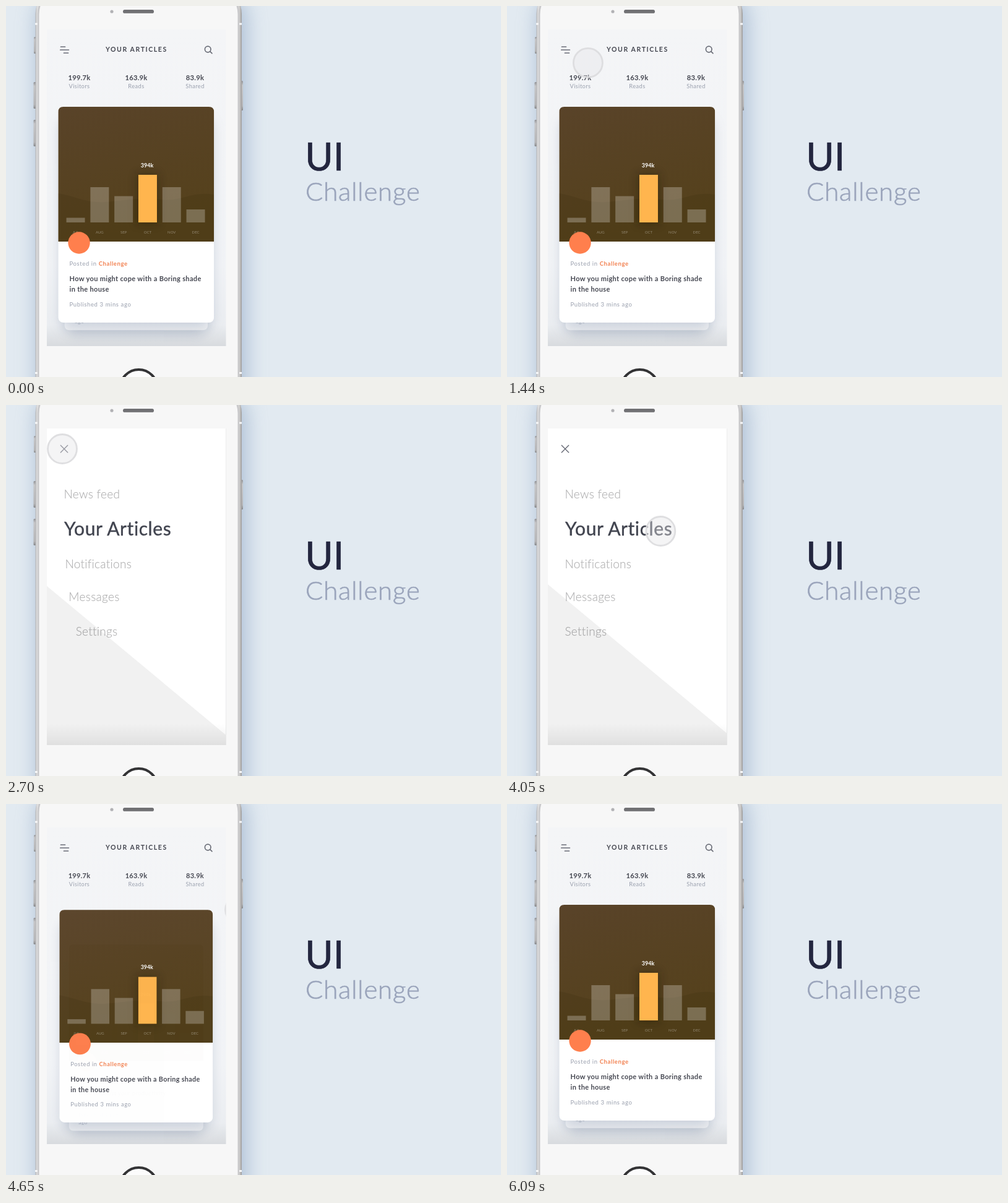
Write an HTML page that moves like this. It is 800 px wide and 600 px high and loops after 6120 ms.

```html
<!DOCTYPE html>
<html lang="en">
<head>
<meta charset="utf-8">
<title>UI Challenge</title>
<style>
html, body { margin: 0; width: 100%; height: 100%; overflow: hidden; background: #e2eaf1; }
svg { display: block; width: 800px; height: 600px; font-family: Lato, "Open Sans", sans-serif; }
.b { font-weight: 700; }
.mid { text-anchor: middle; }
.ink { fill: #454751; }
.soft { fill: #999fad; font-size: 9.5px; letter-spacing: .6px; }
.title { font-size: 11px; letter-spacing: .35px; }
.month { fill: #fff; fill-opacity: .38; font-size: 6px; }
.item { fill: #202024; fill-opacity: .33; stroke: #202024; stroke-opacity: .12; stroke-width: .4px; font-size: 19px; font-weight: 300; letter-spacing: .3px; }
.item.on { fill: #41444f; fill-opacity: 1; stroke: #41444f; stroke-opacity: 1; font-size: 30px; font-weight: 400; letter-spacing: .6px; }
.line { fill: none; stroke: #6b6e78; stroke-width: 1.7; stroke-linecap: round; }
</style>
</head>
<body>
<svg viewBox="0 0 800 600">
  <defs>
    <linearGradient id="page" x2="0" y2="1">
      <stop offset="0" stop-color="#f4f5f7"/><stop offset=".75" stop-color="#f1f3f6"/><stop offset="1" stop-color="#e8ebef"/>
    </linearGradient>
    <linearGradient id="brown" x2=".3" y2="1">
      <stop offset="0" stop-color="#594329"/><stop offset="1" stop-color="#55411b"/>
    </linearGradient>
    <linearGradient id="foot" x2="0" y2="1">
      <stop offset="0" stop-opacity="0"/><stop offset="1" stop-opacity=".07"/>
    </linearGradient>
    <linearGradient id="metal">
      <stop offset="0" stop-color="#b4b4b6"/><stop offset=".008" stop-color="#dededf"/>
      <stop offset=".5" stop-color="#e6e6e7"/><stop offset=".988" stop-color="#d2d1d0"/><stop offset="1" stop-color="#9d9b9b"/>
    </linearGradient>
    <linearGradient id="key" x2="0" y2="1">
      <stop offset="0" stop-color="#8f9094"/><stop offset=".15" stop-color="#c6c6c8"/>
      <stop offset=".85" stop-color="#b5b5b7"/><stop offset="1" stop-color="#858689"/>
    </linearGradient>
    <filter id="wide" x="-30%" y="-10%" width="160%" height="120%"><feGaussianBlur stdDeviation="16"/></filter>
    <filter id="blur" x="-40%" y="-40%" width="180%" height="180%"><feGaussianBlur stdDeviation="11"/></filter>
    <filter id="glow" x="-80%" y="-50%" width="260%" height="200%"><feGaussianBlur stdDeviation="7"/></filter>
    <clipPath id="screen"><rect x="66" y="38" width="289.5" height="512"/></clipPath>
    <clipPath id="wipe"><path id="bands"/></clipPath>
  </defs>

  <rect width="800" height="600" fill="#e2eaf1"/>
  <rect x="48" y="-20" width="342" height="700" rx="40" fill="#829dc0" opacity=".52" filter="url(#wide)"/>

  <g id="phone">
    <g fill="url(#key)">
      <rect x="45" y="50" width="5" height="27" rx="1.5"/>
      <rect x="44.5" y="123" width="5" height="43" rx="1.5"/>
      <rect x="44.5" y="184" width="5" height="43" rx="1.5"/>
      <rect x="378" y="121" width="5" height="48" rx="1.5"/>
    </g>
    <rect x="47.5" y="-35" width="333.5" height="720" rx="48" fill="url(#metal)"/>
    <path d="M47 29h5M376 29h5M47 593.5h5M376 593.5h5" stroke="#f7f7f8" stroke-width="3"/>
    <rect x="51" y="-32" width="326" height="714" rx="45" fill="#c9c9cb"/>
    <rect x="53.5" y="-30" width="321" height="710" rx="43" fill="#f7f7f7"/>
    <circle cx="171" cy="9" r="2.6" fill="#b2b2b5"/>
    <rect x="189" y="6" width="50" height="5.8" rx="2.9" fill="#707073"/>
    <circle cx="214.5" cy="618" r="30" fill="#fcfcfc" stroke="#333335" stroke-width="4"/>
  </g>

  <g clip-path="url(#screen)">
    <rect x="66" y="38" width="290" height="512" fill="url(#page)"/>
    <path class="line" d="M88.5 66h7M87.8 71h13.6M93.5 76h7"/>
    <text class="b ink" x="161" y="74" font-size="10.5" letter-spacing="1.6">YOUR ARTICLES</text>
    <g class="line"><circle cx="326.2" cy="70" r="4.8"/><path d="M329.9 73.7l3 3"/></g>
    <g id="stats"></g>
    <g id="back"></g>
    <g id="front"></g>
    <rect id="shade" x="66" y="38" width="290" height="512"/>
    <g clip-path="url(#wipe)">
      <rect x="66" y="38" width="290" height="512" fill="#fff"/>
      <path id="slope" d="M66 290L356 531.5V820H66Z" fill="#f1f1f1"/>
    </g>
    <g id="items"></g>
    <path id="cross" d="M88.3 65.3l11.4 11.4M99.7 65.3L88.3 76.7" stroke="#636672" stroke-width="1.35" stroke-linecap="round"/>
    <rect x="66" y="515" width="290" height="35" fill="url(#foot)"/>
    <circle id="touch" r="23.5" fill="#e4e4e6" fill-opacity=".4" stroke="#dcdcde" stroke-opacity=".9" stroke-width="2.8"/>
  </g>

  <text x="483.3" y="266" font-size="62" letter-spacing="0" fill="#23263f" stroke="#23263f" stroke-width=".7">UI</text>
  <text x="484" y="315" font-size="42" font-weight="300" letter-spacing=".8" fill="#9aa4bb" stroke="#9aa4bb" stroke-width=".7">Challenge</text>
</svg>

<script>
const LOOP = 6120;
const $ = id => document.getElementById(id);
const clamp = v => Math.max(0, Math.min(1, v));
const prog = (t, start, length) => clamp((t - start) / length);
const inOut = u => u < .5 ? 4 * u ** 3 : 1 - 4 * (1 - u) ** 3;
const mix = (a, b, u) => a + (b - a) * u;

const months = ['JUL', 'AUG', 'SEP', 'OCT', 'NOV', 'DEC'];
const heights = [7.5, 57, 42.5, 77, 57, 21];

function card(title, published) {
  const bars = heights.map((h, i) => {
    const x = 13 + 38.8 * i;
    const fill = i === 3 ? 'fill="#ffb54e"' : 'fill="#fff" fill-opacity=".25"';
    return `<rect x="${x}" y="${187 - h}" width="30" height="${h}" ${fill}/>
      <text class="month mid" x="${x + 15}" y="204.5">${months[i]}</text>`;
  }).join('');
  const rows = (list, y, step, cls) => list.map((s, i) =>
    `<text class="${cls}" x="18" y="${y + i * step}">${s}</text>`).join('');
  return `<rect x="6" y="22" width="239.5" height="335" rx="10" fill="#5d6f90" opacity=".34" filter="url(#blur)"/>
    <rect width="251.5" height="349" rx="8" fill="#fff"/>
    <path d="M0 218V8Q0 0 8 0H243.5Q251.5 0 251.5 8V218Z" fill="url(#brown)"/>
    <path d="M0 140C25 144 45 156 75 154S130 146 165 150S215 136 251.5 142V218H0Z" fill="#2c2000" opacity=".13"/>
    <rect x="126" y="108" width="36" height="82" fill="#1d1400" opacity=".35" filter="url(#glow)"/>
    ${bars}
    <text class="b mid" x="143.5" y="97.5" font-size="9" fill="#fff">394k</text>
    <circle cx="33.5" cy="220" r="17.7" fill="#ff7f4d"/>
    <text class="soft" x="18" y="257">Posted in <tspan class="b" fill="#f28150">Challenge</tspan></text>
    ${rows(title, 282, 17.3, 'b ink title')}
    ${rows(published, 322.5, 14, 'soft')}`;
}

$('front').innerHTML = card(['How you might cope with a Boring shade', 'in the house'], ['Published 3 mins ago']);
$('back').innerHTML = card(['How to boost your productivity', '230% daily'], ['Published 3 mins', 'ago']);

const statX = [118.5, 210.5, 305.5];
$('stats').innerHTML = [['199.7k', 'Visitors'], ['163.9k', 'Reads'], ['83.9k', 'Shared']].map(([n, name]) =>
  `<g><text class="b ink mid" y="-2.5" font-size="11.2" letter-spacing=".25">${n}</text>
   <text class="soft mid" y="10.7" style="font-size:9.3px;letter-spacing:.4px">${name}</text></g>`).join('');
const stats = [...$('stats').children];

const labels = [['News feed', 151], ['Your Articles', 211], ['Notifications', 264], ['Messages', 316.5], ['Settings', 373]];
$('items').innerHTML = labels.map(([s, y], i) =>
  `<text class="item${i === 1 ? ' on' : ''}" x="${i === 1 ? 94 : 93.5}" y="${y}">${s}</text>`).join('');
const items = [...$('items').children];

// Home content shrinks away when the menu opens and springs back when it closes.
function pose(t, lag) {
  if (t < 4200) {
    const e = inOut(prog(t, 1998, 510));
    return { k: 1 - .5 * e, dy: 57 * e, alpha: 1 - .43 * e };
  }
  const u = prog(t, 4260 + lag, 570);
  return { k: 1 - .5 * (1 - u) ** 3, dy: 57 * (1 - u) ** 2, alpha: Math.min(1, .57 + .6 * u) };
}

function placeCard(el, y, size, { k, dy }, alpha) {
  el.setAttribute('transform', `translate(210.3 ${y + dy}) scale(${k * size}) translate(-125.75 -174.5)`);
  el.setAttribute('opacity', alpha);
}

// time, x, y, easing into this point
const path = [
  [700, 382, 224],
  [1260, 153, 104, u => 1 - (1 - u) ** 1.7],
  [1440, 131, 92, u => u],
  [1980, 91, 71, u => u],
  [3030, 91, 71, u => u],
  [3690, 248.3, 204, inOut],
  [4300, 248.3, 204, u => u],
  [4785, 390, 168, inOut]
];

function touchAt(t) {
  const i = path.findIndex(p => p[0] > t);
  if (i < 1) return path[i ? path.length - 1 : 0].slice(1, 3);
  const [t0, x0, y0] = path[i - 1], [t1, x1, y1, ease] = path[i];
  const u = ease((t - t0) / (t1 - t0));
  return [mix(x0, x1, u), mix(y0, y1, u)];
}

const press = (t, start, length) => Math.sin(Math.PI * prog(t, start, length));

// Diagonal band between two heights measured on the left edge of the screen.
const band = (a, b) => `M66 ${a}L356 ${a - 167}V${b - 167}L66 ${b}Z`;

function draw(t) {
  const front = pose(t, 0), back = pose(t, 105);
  placeCard($('front'), 337.5, 1, front, front.alpha);
  placeCard($('back'), 363.8, .92, back, .65);
  stats.forEach((g, i) => {
    g.setAttribute('transform', `translate(${statX[i]} 122.5) scale(${front.k})`);
    g.setAttribute('opacity', front.alpha);
  });

  const shade = inOut(prog(t, 1980, 400)) * (1 - prog(t, 4200, 260));
  $('shade').setAttribute('opacity', .23 * shade);

  const open = (t < 4000 ? prog(t, 2140, 460) : 1 - prog(t, 4110, 340)) ** 1.69;
  $('bands').setAttribute('d', open
    ? band(-150, 38 + 151 * open) + band(326.5 - 140 * open, 326.5 + 140 * open) + band(717 - 290 * open, 900)
    : '');
  $('slope').setAttribute('transform', `translate(0 ${260 * (1 - prog(t, 2360, 400)) ** 2.4})`);

  items.forEach((el, i) => {
    const came = prog(t, 2270 + 40 * i, 400), left = prog(t, 4080 + 25 * i, 250);
    el.setAttribute('transform', `translate(${290 * ((1 - came) ** 2.4 + left ** 2.4)} 0)`);
    el.setAttribute('opacity', Math.min(1, (1.5 * came) ** 1.5) * (1 - left));
  });
  $('cross').setAttribute('opacity', prog(t, 2470, 160) * (1 - prog(t, 4110, 140)));

  const [x, y] = touchAt(t);
  const k = 1 - .18 * (press(t, 1830, 330) + press(t, 3860, 170));
  $('touch').setAttribute('transform', `translate(${x} ${y}) scale(${k})`);
}

function tick() {
  draw(performance.now() % LOOP);
  requestAnimationFrame(tick);
}
tick();
</script>
</body>
</html>
```
